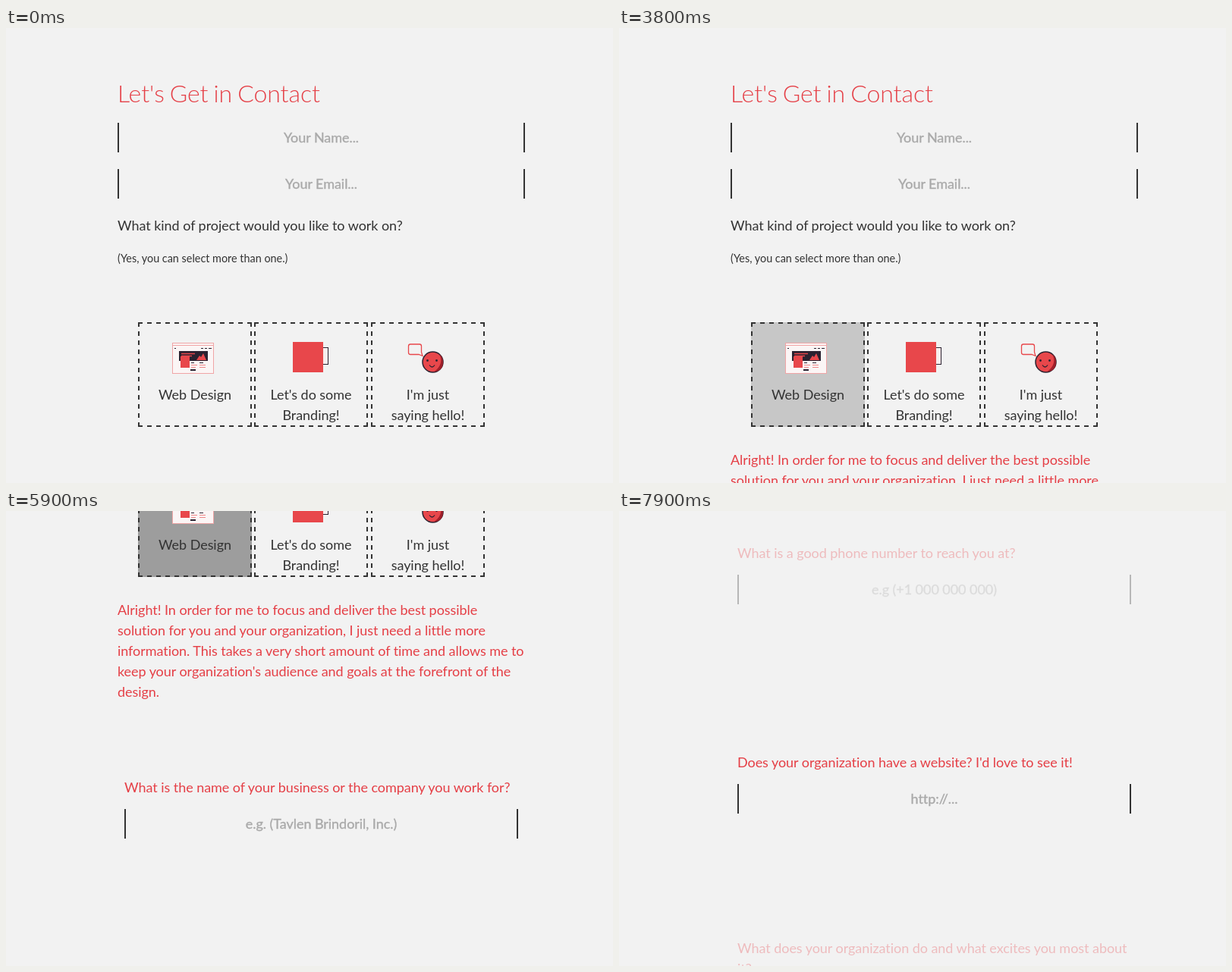
An HTML page for the animation above (8000 ms loop, 800x600 px).

```html
<!DOCTYPE html>
<html lang="en">
<head>
<meta charset="utf-8">
<title>Contact form</title>
<style>
  html, body { margin: 0; width: 100%; height: 100%; overflow: hidden; background: #f2f2f2; }
  svg { display: block; width: 800px; height: 600px; overflow: hidden; }
  text { font: 18px Lato, sans-serif; letter-spacing: -.05px; font-variant-ligatures: none; fill: #333; }
  .title { font-size: 32px; font-weight: 300; word-spacing: -.05em; }
  .small { font-size: 14.4px; letter-spacing: 0; }
  .title, .red { fill: #e53f46; }
  .hint { fill: #a9a9a9; stroke: #a9a9a9; stroke-width: .35px; }
  .mid { text-anchor: middle; }
</style>
</head>
<body>
<svg viewBox="0 0 800 600"><g id="page"></g></svg>
<script>
const RED = '#e8474b', DARK = '#2b2230', LOOP = 8000, STEP = 100;
const page = document.getElementById('page');

const text = (x, y, str, cls = '') => `<text x="${x}" y="${y}" class="${cls}">${str}</text>`;
const rect = (x, y, w, h, fill, more = '') =>
  `<rect x="${x}" y="${y}" width="${w}" height="${h}" fill="${fill}" ${more}/>`;
const path = (d, fill, more = '') => `<path d="${d}" fill="${fill}" ${more}/>`;
const lines = (x, y, list, cls) => list.map((s, i) => text(x, y + 27 * i, s, cls)).join('');

const field = (left, right, top, hint, id = '') =>
  (id && rect(left, top, right - left, 39, '#000', `id="${id}" opacity="0"`)) +
  rect(left, top, 2, 39, '#333') + rect(right - 2, top, 2, 39, '#333') +
  text(415.5, top + 26, hint, 'hint mid');

const box = (x, icon, label) =>
  rect(x, 388, 150, 138, '#9d9d9d', 'class="shade" opacity="0"') +
  path(`M${x} 389h150M${x} 525h150M${x + 1} 388v138M${x + 149} 388v138`, 'none',
    'stroke="#333" stroke-width="2" stroke-dasharray="6"') +
  icon + lines(x + 75, 490, label, 'mid');

const questions = [
  { y: 810, label: ['What is the name of your business or the company you work for?'], hint: 'e.g. (Tavlen Brindoril, Inc.)' },
  { y: 1086, label: ['What is a good phone number to reach you at?'], hint: 'e.g (+1 000 000 000)' },
  { y: 1362, label: ["Does your organization have a website? I'd love to see it!"], hint: 'http://...' },
  { y: 1607, label: ['What does your organization do and what excites you most about', 'it?'] }
];
const question = q => `<g class="question">${lines(156, q.y, q.label, 'red')}${
  q.hint ? field(156, 675, q.y + 22, q.hint) : ''}</g>`;

const browserIcon =
  rect(219.5, 415.5, 54, 40, '#fbf5f5', 'stroke="#f0a5a6"') +
  path('M220 418.5h53', 'none', 'stroke="#f0a5a6"') +
  path('M222 422.5h2M257 422.5h3m2 0h3m2 0h4', 'none', `stroke="${DARK}"`) +
  rect(228, 426, 38, 13, DARK) +
  path('M231 429.5h18m-18 3h14', 'none', `stroke="${RED}" stroke-width="1.5"`) +
  path('M251 438l4-6 2 2 3-5 4 9z', RED) +
  rect(230, 433, 12, 15, RED) +
  path('M244 441.5h4m7 0h5', 'none', `stroke="${DARK}"`) +
  path('M244 444.5h8m-8 3h6m5-3h8m-8 3h8', 'none', 'stroke="#ee8587"') +
  rect(243, 450, 7, 2, DARK);

const brandIcon =
  rect(402.5, 421.5, 22, 22, '#f8eeee', `stroke="${DARK}"`) +
  rect(378, 414, 40, 40, RED);

const helloIcon =
  path('M533 417h12q2.5 0 2.5 2.5v8l1.5 5-5-2h-11q-2.5 0-2.5-2.5v-8.5q0-2.5 2.5-2.5z', 'none',
    `stroke="${RED}" stroke-width="1.3"`) +
  `<circle cx="562.5" cy="440.5" r="13.5" fill="${RED}" stroke="${DARK}" stroke-width="1.5"/>` +
  path('M571 430q7 13-7 23.5 12-1 12-13 0-7-5-10.500z', '#9e1f2a') +
  path('M558 444.5q3.5 5 7 0', 'none', `stroke="${DARK}" stroke-width="1.3"`) +
  `<g fill="${DARK}"><circle cx="555.5" cy="438.5" r="1.4"/><circle cx="567.5" cy="438.5" r="1.4"/></g>`;

page.innerHTML =
  text(147, 98, "Let's Get in Contact", 'title') +
  field(147, 684, 125, 'Your Name...', 'name') +
  field(147, 684, 186, 'Your Email...', 'email') +
  text(147, 267, 'What kind of project would you like to work on?') +
  text(147, 309, '(Yes, you can select more than one.)', 'small') +
  box(174, browserIcon, ['Web Design']) +
  box(327, brandIcon, ["Let's do some", 'Branding!']) +
  box(481, helloIcon, ["I'm just", 'saying hello!']) +
  `<g id="intro">` + lines(147, 576, [
    'Alright! In order for me to focus and deliver the best possible',
    'solution for you and your organization, I just need a little more',
    'information. This takes a very short amount of time and allows me to',
    "keep your organization's audience and goals at the forefront of the",
    'design.'], 'red') + `</g>` +
  questions.map(question).join('');

const webShade = page.querySelector('.shade');
const [nameFill, emailFill, intro] = ['name', 'email', 'intro'].map(id => document.getElementById(id));
const groups = [...page.querySelectorAll('.question')];

const clamp = v => Math.min(1, Math.max(0, v));
const ramp = (t, start, length) => clamp((t - start) / length);
const fade = (node, opacity) => node.setAttribute('opacity', opacity);

// [time, scroll offset]
const scrollKeys = [[0, 0], [4690, 0], [4700, 9], [5100, 224], [5200, 224], [5300, 233], [5400, 336],
  [5500, 336], [5900, 439], [6500, 624], [7900, 1024]];
function scrollAt(t) {
  const i = scrollKeys.findIndex(k => k[0] >= t);
  if (i < 1) return 0;
  const [t0, y0] = scrollKeys[i - 1], [t1, y1] = scrollKeys[i];
  return Math.round(y0 + (y1 - y0) * ramp(t, t0, t1 - t0));
}

function draw(now) {
  const t = Math.floor(now % LOOP / STEP) * STEP;
  const scroll = scrollAt(t);
  page.setAttribute('transform', `translate(0 ${-scroll})`);

  fade(nameFill, .08 * (ramp(t, 490, 210) - ramp(t, 1190, 210)));
  fade(emailFill, .08 * (ramp(t, 1190, 200) - ramp(t, 1300, 200)));
  fade(webShade, .5 * ramp(t, 3090, 210) + .5 * ramp(t, 3950, 250));
  fade(intro, ramp(t, 3400, 400));

  // A question lights up as it rises and dims when the next one takes over.
  const lit = questions.map(q => clamp((526 - (q.y - scroll)) / 50));
  groups.forEach((g, i) => fade(g, .3 + .7 * (lit[i] - (lit[i + 1] || 0))));
  requestAnimationFrame(draw);
}
requestAnimationFrame(draw);
</script>
</body>
</html>
```
